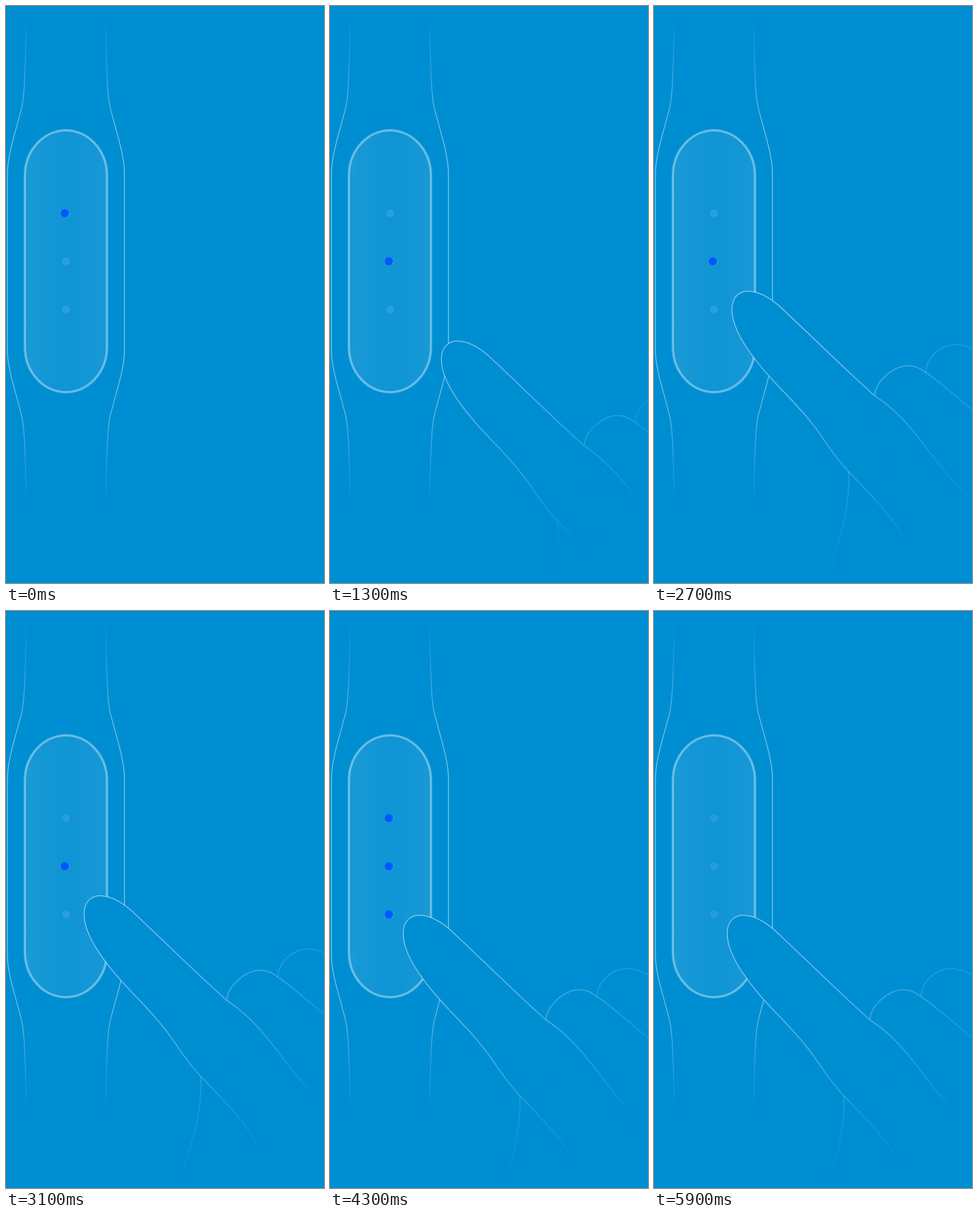
An HTML page with a canvas that plays this animation: 556x1007 px, repeating every 6200 ms.

```html
<!DOCTYPE html>
<html lang="en">
<head>
<meta charset="utf-8">
<title>Wristband swipe</title>
<style>
html, body { margin: 0; width: 100%; height: 100%; overflow: hidden; background: #008ed2; }
canvas { display: block; width: 556px; height: 1007px; }
</style>
</head>
<body>
<canvas id="stage" width="556" height="1007"></canvas>
<script>
const ctx = document.getElementById('stage').getContext('2d');
const W = 556, H = 1007, LOOP = 6200, TICK = 100;
const BG = '#008ed2', LIT = '#0055ff';
const DOTS = [361.5, 445.5, 529.5];
const BOUNCE = [0, 1, 2, 1];

const white = a => `rgba(255,255,255,${a})`;

function fill(gradient, stops) {
  stops.forEach(([at, a]) => gradient.addColorStop(at, white(a)));
  return gradient;
}

// Half of the strap outline; the other half is its mirror image.
const strap = new Path2D(
  'M35 15 C34.5 90 32 155 28.3 173 L27.3 178 C18 215 2.5 260 2.5 292 ' +
  'L2.5 602 C2.5 634 18 676 27.3 715 L28.3 720 C32 738 34.5 800 35 875');
const strapInk = fill(ctx.createLinearGradient(0, 12, 0, 878),
  [[0, 0], [0.1, 0.18], [0.2, 0.4], [0.32, 0.5], [0.68, 0.5], [0.8, 0.4], [0.9, 0.18], [1, 0]]);

const capsule = new Path2D(
  'M33 296 A71.8 79 0 0 1 176.6 296 L176.6 595 A71.8 79 0 0 1 33 595 Z');
const glass = fill(ctx.createLinearGradient(33, 0, 177, 0),
  [[0, 0.105], [0.3, 0.075], [0.55, 0.06], [1, 0.095]]);

const index = new Path2D(
  'M378 714 C335 676 300 641 212 558 C195 543 176 531 156 531 ' +
  'C138 531 128 544 128 563 C128 590 146 620 164 644 C182 669 199 686 214 702 ' +
  'C262 751 278 774 296 801 C308 818 320 833 332 846 C368 884 412 926 431 968');
const palm = new Path2D(
  'M378 714 C410 735 432 757 470 807 C502 849 520 872 556 903');
const middle = new Path2D(
  'M378 714 C376 692 409 661 435 661 C452 661 459 668 467 673 C490 688 520 715 556 745 L620 798');
const ring = new Path2D(
  'M467 673 C468 645 494 624 520 624 C538 624 556 634 570 643');
const thumb = new Path2D(
  'M332 846 C334 884 326 935 313 970 C304 991 301 1003 309 1024');

const LINES = [[index, 0.53], [palm, 0.5], [middle, 0.42], [ring, 0.28], [thumb, 0.4]];

function ease(t, start, end) {
  const p = Math.min(1, Math.max(0, (t - start) / (end - start)));
  return p < 0.5 ? 4 * p ** 3 : 1 - 4 * (1 - p) ** 3;
}

function dot(x, y, color, alpha) {
  ctx.globalAlpha = alpha;
  ctx.fillStyle = color;
  ctx.beginPath();
  ctx.arc(x, y, 7, 0, Math.PI * 2);
  ctx.fill();
  ctx.globalAlpha = 1;
}

function drawBand() {
  ctx.lineWidth = 1.5;
  ctx.strokeStyle = strapInk;
  ctx.stroke(strap);
  ctx.save();
  ctx.transform(-1, 0, 0, 1, 209.6, 0);
  ctx.stroke(strap);
  ctx.restore();

  ctx.fillStyle = glass;
  ctx.fill(capsule);
  ctx.lineWidth = 4;
  ctx.strokeStyle = white(0.38);
  ctx.stroke(capsule);
}

function drawDots(t) {
  const runner = BOUNCE[Math.floor(t / TICK) % BOUNCE.length];
  const glow = Math.max(0.05, 1 - ease(t, 4300, 6200));
  DOTS.forEach((y, i) => {
    dot(105, y, '#fff', 0.1);
    if (t >= 4300) dot(103, y, LIT, glow);
    else if (i === runner) dot(103, y, LIT, 1);
  });
}

function drawHand(t) {
  const away = 1 - ease(t, 700, 1600);
  const swipe = ease(t, 2200, 2800) - ease(t, 3600, 4200);
  const dx = 450 * away + 8.5 * swipe;
  const dy = 363 * away - 34 * swipe;
  if (dx > 440) return;

  ctx.save();
  ctx.translate(dx, dy);
  ctx.fillStyle = BG;
  ctx.fill(index);
  // The fade stays fixed to the stage while the hand moves.
  ctx.strokeStyle = fill(
    ctx.createRadialGradient(150 - dx, 400 - dy, 0, 150 - dx, 400 - dy, 630),
    [[0, 1], [0.25, 1], [0.5, 0.85], [0.62, 0.66], [0.82, 0.3], [1, 0]]);
  ctx.lineWidth = 1.5;
  for (const [path, alpha] of LINES) {
    ctx.globalAlpha = alpha;
    ctx.stroke(path);
  }
  ctx.restore();
}

function draw(now) {
  const t = Math.floor((now % LOOP) / TICK) * TICK;
  ctx.fillStyle = BG;
  ctx.fillRect(0, 0, W, H);
  drawBand();
  drawDots(t);
  drawHand(t);
}

const begin = performance.now();
function loop() {
  draw(performance.now() - begin);
  requestAnimationFrame(loop);
}
loop();
</script>
</body>
</html>
```
